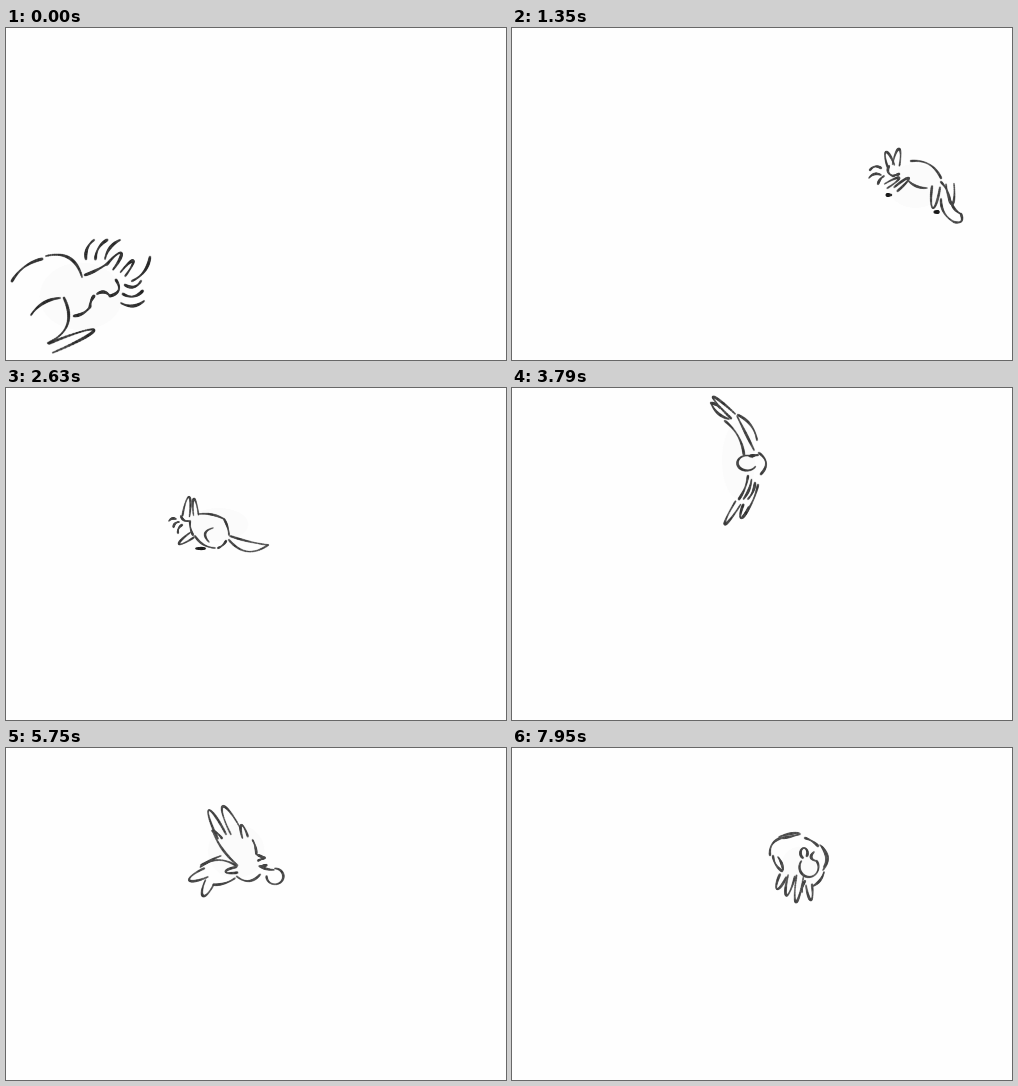
An HTML page with a canvas that plays this animation: 500x332 px, repeating every 8 s.

```html
<!DOCTYPE html>
<html lang="en">
<head>
<meta charset="utf-8">
<title>Ink creature</title>
<style>
html, body { margin: 0; width: 100%; height: 100%; overflow: hidden; background: #fefefe; }
canvas { display: block; width: 500px; height: 332px; }
</style>
</head>
<body>
<canvas id="stage"></canvas>
<script>
const W = 500, H = 332, LOOP = 8000, TAU = Math.PI * 2;
const canvas = document.getElementById('stage');
const ctx = canvas.getContext('2d');
const dpr = window.devicePixelRatio || 1;
canvas.width = W * dpr;
canvas.height = H * dpr;
ctx.scale(dpr, dpr);
ctx.lineCap = 'round';

// Pen strokes: each is a list of points sampled from a formula
const trace = (f, n = 24) => Array.from({ length: n + 1 }, (_, i) => f(i / n));
const fan = (n, f) => Array.from({ length: n }, (_, i) => f(i / (n - 1)));

// Bowed line; a positive bend bulges to the left of its direction
function arc(x, y, x2, y2, bend = 0) {
  const dx = x2 - x, dy = y2 - y, len = Math.hypot(dx, dy);
  return trace(t => {
    const b = bend * 4 * t * (1 - t) / len;
    return [x + dx * t + dy * b, y + dy * t - dx * b];
  });
}

// Hairpin around an axis from base to tip: ears, paws, quills
function feather(x, y, tipX, tipY, half) {
  const dx = tipX - x, dy = tipY - y, len = Math.hypot(dx, dy);
  return trace(t => {
    const along = Math.sin(Math.PI * t), side = half * Math.cos(Math.PI * t) / len;
    return [x + dx * along + dy * side, y + dy * along - dx * side];
  }, 32);
}

// Ellipse between two angles, given in turns
const ring = (x, y, rx, ry, from = 0, to = 1) => trace(t => {
  const a = TAU * (from + (to - from) * t);
  return [x + rx * Math.cos(a), y + ry * Math.sin(a)];
}, 32);

const zigzag = (x, y, w, h, folds) => trace(t =>
  [x + w * Math.abs((t * folds + 1) % 2 - 1), y + h * t], folds * 6);

const dot = (x, y, w) => Object.assign(arc(x, y, x + w, y), { heavy: true });

function pose(width, grey, ...strokes) {
  const xs = strokes.flat().map(p => p[0]), ys = strokes.flat().map(p => p[1]);
  const x = Math.min(...xs), y = Math.min(...ys);
  const w = Math.max(...xs) - x, h = Math.max(...ys) - y;
  return { width, grey, strokes, w, h, x: x + w / 2, y: y + h / 2, size: Math.hypot(w, h) };
}

const mirror = p => ({
  ...p,
  strokes: p.strokes.map(s => Object.assign(s.map(([x, y]) => [2 * p.x - x, y]), { heavy: s.heavy }))
});

const close = pose(2.3, 44,
  // back, hair, ears
  arc(6, 253, 36, 231, 4), arc(40, 228, 76, 249, 10),
  ...fan(3, t => arc(80 + 19 * t, 231, 88 + 26 * t, 212, 3)),
  arc(79, 247, 102, 235, -1), feather(104, 239, 115, 225, 4),
  feather(117, 246, 127, 233, 3), arc(144, 229, 126, 253, 4),
  // muzzle, whiskers
  arc(110, 252, 104, 268, 6), arc(104, 268, 91, 266, -3),
  ...fan(3, t => arc(119 - 4 * t, 257 + 18 * t, 135 + 3 * t, 253 + 20 * t, -4)),
  // limbs
  arc(68, 288, 84, 279, -2), arc(84, 279, 88, 268, 1),
  arc(25, 287, 54, 270, 4), arc(58, 270, 42, 315, 12), feather(45, 320, 88, 302, 5));

const cat = pose(1.8, 62,
  ...fan(2, t => arc(358 - t, 142 + 8 * t, 369, 140 + 7 * t, 2.5)), arc(366, 156, 372, 148, 1),
  feather(379, 138, 374, 124, 3.5), feather(384, 137, 387, 121, 3.5),
  arc(377, 138, 381, 148, -3), arc(381, 148, 387, 146),
  feather(374, 158, 387, 150, 2.5), feather(384, 161, 397, 150, 2.5),
  arc(399, 133, 429, 150, 6), arc(394, 150, 415, 160, -3),
  feather(424, 159, 421, 180, 4), arc(429, 154, 438, 174, 2), feather(438, 156, 440, 176, 4),
  arc(429, 171, 442, 194, -4), arc(442, 194, 449, 186, -5), arc(449, 186, 439, 173, 2),
  dot(375, 167, 4), dot(423, 184, 3));

const hare = pose(1.6, 60,
  feather(180, 128, 183, 109, 3.5), feather(190, 127, 188, 111, 2.5),
  arc(175, 128, 183, 133, -2), arc(184, 133, 187, 147, -1),
  ...fan(3, t => arc(163 + 9 * t, 133 + 12 * t, 170 + 6 * t, 131 + 6 * t, 1.5)),
  arc(193, 126, 218, 131, 2), arc(218, 131, 223, 147, 1),
  feather(186, 147, 173, 156, 3), arc(207, 140, 203, 154, -6),
  arc(189, 148, 209, 160, -3), arc(212, 160, 220, 153, -1), dot(190, 160.5, 9),
  arc(224, 148, 262, 157, -1), arc(262, 157, 223, 152, 9));

const bank = pose(2, 58,
  // upper wing
  feather(221, 28, 201, 9, 3), arc(199, 15, 217, 31, -3), arc(199, 15, 208, 20, 1),
  arc(213, 33, 232, 67, 4), arc(225, 28, 242, 62), arc(226, 27, 245, 52, 4),
  // head and shoulder
  arc(247, 65, 249, 86, 6), ring(235, 75, 9.5, 7.5, .08, .85), arc(238, 68, 246, 67),
  // lower wing
  ...fan(3, t => arc(236 + 7 * t, 88 + 7 * t, 227 + 9 * t, 111, 1.5)),
  arc(246, 97, 231, 129, 2), feather(226, 115, 213, 136, 3), feather(234, 118, 229, 130, 3));

const bird = pose(1.8, 64,
  ring(130, 77, 9, 8.5, 0, .75), arc(131, 70, 147, 66, -1), arc(139, 65, 146, 66),
  // raised wing
  arc(148, 60, 141, 57), arc(141, 57, 149, 54), arc(150, 53, 154, 38, 1),
  feather(162, 35, 166, 22, 3), feather(172, 29, 186, 2, 6), feather(187, 34, 201, 6, 5),
  arc(187, 36, 197, 28, 1), arc(197, 28, 170, 65, 3),
  // belly and tail
  arc(146, 75, 171, 77, -6), arc(171, 66, 209, 65, 6), arc(188, 55, 210, 67, 1),
  feather(171, 70, 183, 72, 3), feather(204, 73, 222, 81, 5),
  feather(200, 83, 207, 98, 5), arc(196, 86, 173, 79, 2));

const glide = pose(1.9, 66,
  // upper wing
  arc(148, 104, 154, 84, 3), arc(157, 80, 158, 94, -2), arc(152, 97, 158, 123, -3),
  arc(158, 93, 188, 81, 2), arc(188, 81, 176, 97, 4), arc(174, 98, 202, 95, 2),
  arc(202, 95, 183, 111, 1), zigzag(184, 109, 10, 11, 3),
  // head, body, tail
  ring(179, 131.5, 7, 8.5), arc(163, 127, 175, 123, 1), arc(166, 139, 173, 140),
  arc(189, 121, 201, 137, 5), ring(214.5, 127.5, 10.5, 10.5),
  // lower wing
  arc(186, 142, 200, 140, 2), zigzag(196, 141, 6, 11, 3),
  arc(179, 145, 177, 187, -12), arc(172, 169, 176, 182, -1), feather(182, 173, 190, 195, 5),
  arc(201, 153, 210, 164, -3), arc(211, 164, 203, 172, 2),
  arc(203, 171, 213, 190, 1), arc(194, 177, 213, 191, -4));

const curl = pose(1.9, 68,
  arc(258, 107, 269, 90, 4), arc(267, 89, 287, 85, 1), arc(270, 90, 288, 86, -.5),
  arc(293, 90, 306, 98, 1), arc(308, 97, 311, 122, 6), arc(310, 99, 312, 119, 3),
  arc(261, 108, 270, 123, -2), arc(266, 109, 271, 122, 1),
  ring(292, 105, 3.5, 5, .3, 1.1), ring(297, 119, 9.5, 10, -.1, .6), arc(304, 113, 302, 104, 4),
  ...fan(3, t => feather(271 + 17 * t, 128, 265 + 19 * t, 141 + 13 * t, 3.5)),
  arc(293, 133, 290, 144, -1), feather(297, 137, 299, 152, 3), arc(312, 124, 301, 138, 2));

const catR = mirror(cat), hareR = mirror(hare), birdR = mirror(bird);

// Flight path: centre and diagonal at a time; a drawing marks its own place
const path = [];
const home = (at, { x, y, size }) => path.push({ at, x, y, size });
const via = (at, x, y, size) => path.push({ at, x, y, size });

home(0, close);
via(870, 346, 166, 125);
home(1350, cat);
via(2020, 342, 145, 122);
home(2630, hare);
via(2870, 156, 106, 120);
via(3230, 164, 80, 150);
home(3790, bank);
via(4110, 234, 72, 150);
via(4690, 137, 75, 155);
home(4970, bird);
via(5540, 212, 97, 125);
via(6120, 300, 127, 150);
via(6400, 276, 131, 138);
home(6720, glide);
via(7200, 160, 137, 135);
via(7470, 276, 118, 100);
home(7950, curl);

function locate(t) {
  const i = Math.max(1, path.findIndex(p => p.at >= t));
  const a = path[i - 1], b = path[i], k = (t - a.at) / (b.at - a.at);
  const mix = key => a[key] + (b[key] - a[key]) * k;
  return { x: mix('x'), y: mix('y'), size: mix('size') };
}

// Held drawings: evenly spaced changes that cycle through some poses
const shots = [{ at: 0, drawing: close }];
function run(from, to, steps, ...cycle) {
  for (let i = 0; i < steps; i++) {
    shots.push({ at: from + (to - from) * i / (steps - 1), drawing: cycle[i % cycle.length] });
  }
}

run(120, 870, 8, close, catR, hareR);
run(960, 1350, 5, cat, hare);
run(1510, 2020, 6, cat, hare);
run(2180, 2630, 5, hare, cat);
run(2750, 2870, 2, cat, hare);
run(2990, 3230, 3, bird);
run(3390, 3630, 3, birdR, birdR, bank);
run(3790, 4110, 3, bank);
run(4270, 4690, 5, bank, bird);
run(4850, 4970, 2, bird);
run(5060, 5540, 6, bird, glide);
run(5660, 5960, 4, birdR);
run(6120, 6280, 2, birdR);
run(6400, 6560, 2, glide);
run(6720, 7040, 3, glide);
run(7200, 7470, 4, glide, bird, birdR, curl);
run(7630, 7950, 3, curl);

const noise = n => { const v = Math.sin(n * 12.9898) * 43758.5453; return v - Math.floor(v); };

// A soft pale edge under a darker core with uneven pressure
function ink(pts, width, grey, seed) {
  for (const [spread, alpha] of [[0.9, 0.25], [0, 0.9]]) {
    for (let i = 1; i < pts.length; i++) {
      const press = 0.85 + 0.28 * Math.sin(i * 0.25 + seed * 2.1);
      const tone = Math.round(grey + 36 * noise(seed * 97 + i) - 12 * press);
      ctx.lineWidth = width * press + spread;
      ctx.strokeStyle = `rgba(${tone},${tone},${tone},${alpha})`;
      ctx.beginPath();
      ctx.moveTo(...pts[i - 1]);
      ctx.lineTo(...pts[i]);
      ctx.stroke();
    }
  }
}

function draw({ at, drawing }) {
  const spot = locate(at), k = spot.size / drawing.size;
  const place = ([x, y]) => [spot.x + (x - drawing.x) * k, spot.y + (y - drawing.y) * k];

  ctx.fillStyle = '#fefefe';
  ctx.fillRect(0, 0, W, H);
  ctx.fillStyle = '#fbfbfb';
  ctx.beginPath();
  ctx.ellipse(spot.x, spot.y, drawing.w * k * 0.3, drawing.h * k * 0.3, 0, 0, TAU);
  ctx.fill();
  drawing.strokes.forEach((s, i) =>
    ink(s.map(place), drawing.width * (s.heavy ? 1.4 : 1), s.heavy ? 25 : drawing.grey, i + 1));
}

let shown;
function tick() {
  const t = performance.now() % LOOP;
  const shot = shots.findLast(s => s.at <= t);
  if (shot !== shown) draw(shown = shot);
  requestAnimationFrame(tick);
}
tick();
</script>
</body>
</html>
```
